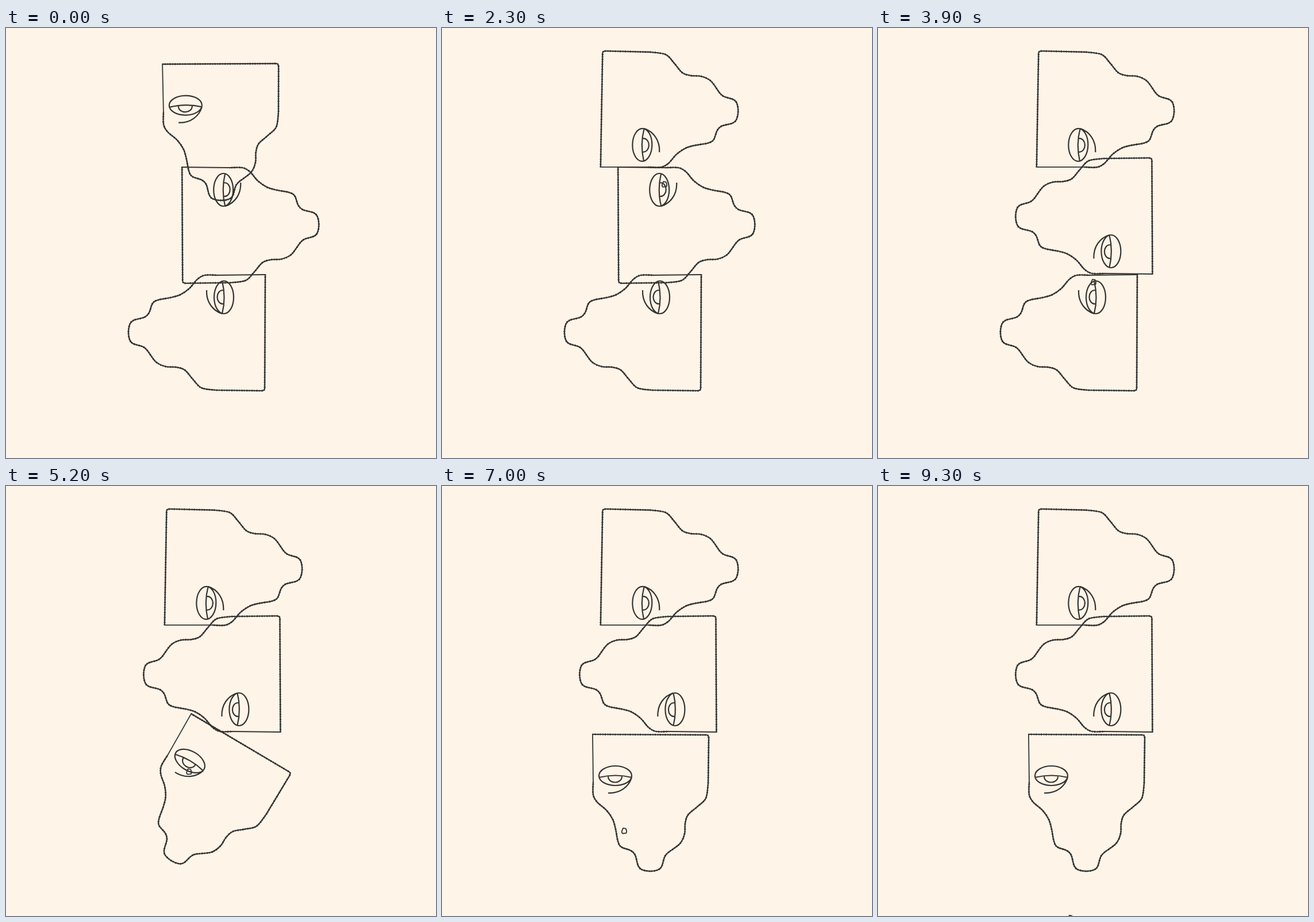
Recreate the animation shown at these times as an HTML page. Size 748 by 748 pixels, loop 9.4 s.

```html
<!DOCTYPE html>
<html lang="en">
<head>
<meta charset="utf-8">
<title>Falling tear</title>
<style>
  html, body { margin: 0; width: 100%; height: 100%; overflow: hidden; background: #fff4e8; }
  svg { display: block; width: 100vw; height: 100vh; }
  path { fill: none; stroke: #353433; stroke-width: 2.2; stroke-linejoin: round; }
  .thin { stroke-width: 1.8; }
  .grain { stroke-width: 3.1; stroke-dasharray: 1.2 2.4 2 3.1; }
</style>
</head>
<body>
<svg viewBox="0 0 748 748">
  <defs><g id="head"></g></defs>
  <g id="heads"></g>
  <path id="tear" class="thin" d="M-2-4.7 L2.5-4 Q5 0 3.5 4 L-3 4.7 Q-5 2-4 0Z"/>
</svg>
<script>
const LOOP = 9400, STEP = 100;
const OVERSHOOT = 46, SETTLE = 250;
const EYE = [-56.5, -21];

const byId = id => document.getElementById(id);
const mix = (a, b, k) => a + (b - a) * k;
const ease = v => (1 - Math.cos(Math.PI * Math.min(1, Math.max(0, v)))) / 2;

function add(parent, tag, attributes) {
  const node = document.createElementNS('http://www.w3.org/2000/svg', tag);
  for (const name in attributes) node.setAttribute(name, attributes[name]);
  return parent.appendChild(node);
}

// Smooth curve through the points (Catmull-Rom as cubic segments).
function spline(points) {
  const at = i => points[Math.min(points.length - 1, Math.max(0, i))];
  const handle = (i, side) => at(i).map((v, axis) => v + side * (at(i + 1)[axis] - at(i - 1)[axis]) / 6);
  return points.slice(1).map((p, i) => `C${handle(i, 1)} ${handle(i + 1, -1)} ${p}`).join('');
}

function drawHead(parent) {
  const jaw = [
    [105, -8], [101, 18], [86, 33], [70, 47], [65, 62], [64, 80], [56, 97], [35, 113], [29, 121],
    [24, 137], [17, 143], [3, 145], [-11, 142], [-17, 135], [-22, 117], [-30, 109], [-46, 103],
    [-52, 93], [-56, 72], [-61, 55], [-72, 39], [-88, 25], [-95, 12], [-95, -10]
  ];
  const outline = 'M-96-93 L102-92 Q106-92 106-86 L105-8' + spline(jaw);
  const eye = 'M-85-21 a28.5 17 0 0 1 57 0 a28.5 17 0 0 1 -57 0 M-85-18 Q-56-25-28-18'
    + 'M-69-20 C-69-6-45-6-45-20 M-28-18 C-33-2-48 10-69 9';
  add(parent, 'path', { d: outline });
  add(parent, 'path', { d: outline, class: 'grain' });
  add(parent, 'path', { d: 'M-95-10 L-96-94', class: 'thin' });
  add(parent, 'path', { d: eye });
}

// (x, y) is the pivot on stage, (cx, cy) the same pivot inside the head.
const heads = [
  { x: 365.5, y: 150.5, cx: -3.5, cy: -4.5, flip: 1, from: -0.6, to: -89.3, start: 0, lift: 0 },
  { x: 391.8, y: 335, cx: 3, cy: -7.4, flip: -1, from: -90, to: 90, start: 2800, lift: 10 },
  { x: 358, y: 525, cx: 0, cy: 0, flip: 1, from: 90, to: 0, start: 5000, lift: 0 }
];

// A tear hits the eye, the head swings past its rest angle and falls back.
function pose(h, t) {
  const peak = h.to + Math.sign(h.to - h.from) * OVERSHOOT;
  const duration = 230 + 1.5 * Math.abs(peak - h.from);
  const rise = ease((t - h.start) / duration);
  const settle = ease((t - h.start - duration) / SETTLE);
  const lift = h.lift * Math.max(0, Math.sin(2 * Math.PI * rise));
  return { angle: mix(mix(h.from, peak, rise), h.to, settle), x: h.x - lift / 5, y: h.y - lift };
}

// Stage position of a point given relative to the eye of a head.
function fromEye(h, t, [dx, dy]) {
  const { angle, x, y } = pose(h, t);
  const a = angle * Math.PI / 180;
  const px = (EYE[0] + dx) * h.flip - h.cx, py = EYE[1] + dy - h.cy;
  return [x + px * Math.cos(a) - py * Math.sin(a), y + px * Math.sin(a) + py * Math.cos(a)];
}

// Legs of the tear's way: free falls on stage, or rides inside the eye of a head.
const tearStart = 500;
const legs = [
  { until: 2000, from: [377, 219], to: [382, 263], power: 0.8 },
  { until: 3600, from: [-18, 4], to: [27, 30], head: heads[1] },
  { until: 3900, from: [376, 361], to: [375, 442] },
  { until: 5000, from: [375, 442], to: [368, 473] },
  { until: 5600, from: [4.5, 11], to: [15.5, 28], head: heads[2] },
  { until: 7500, from: [317, 532], to: [317, 624] },
  { until: 8000, from: [317, 624], to: [332, 646] },
  { until: LOOP, from: [333, 646], to: [335, 764], power: 1.5 }
];

function tearAt(t) {
  const i = legs.findIndex(leg => t < leg.until);
  const { until, from, to, head, power = 1 } = legs[i];
  const begin = i ? legs[i - 1].until : tearStart;
  const k = ((t - begin) / (until - begin)) ** power;
  const point = from.map((v, axis) => mix(v, to[axis], k));
  return head ? fromEye(head, t, point) : point;
}

function draw(now) {
  const t = Math.floor(now % LOOP / STEP) * STEP;
  for (const h of heads) {
    const { angle, x, y } = pose(h, t);
    h.node.setAttribute('transform',
      `translate(${x} ${y}) rotate(${angle}) translate(${-h.cx} ${-h.cy}) scale(${h.flip} 1)`);
  }
  const visible = t >= tearStart;
  byId('tear').style.display = visible ? '' : 'none';
  if (visible) byId('tear').setAttribute('transform', `translate(${tearAt(t)})`);
}

drawHead(byId('head'));
for (const h of heads) h.node = add(byId('heads'), 'use', { href: '#head' });

const begin = performance.now();
function loop() {
  draw(performance.now() - begin);
  requestAnimationFrame(loop);
}
loop();
</script>
</body>
</html>
```
